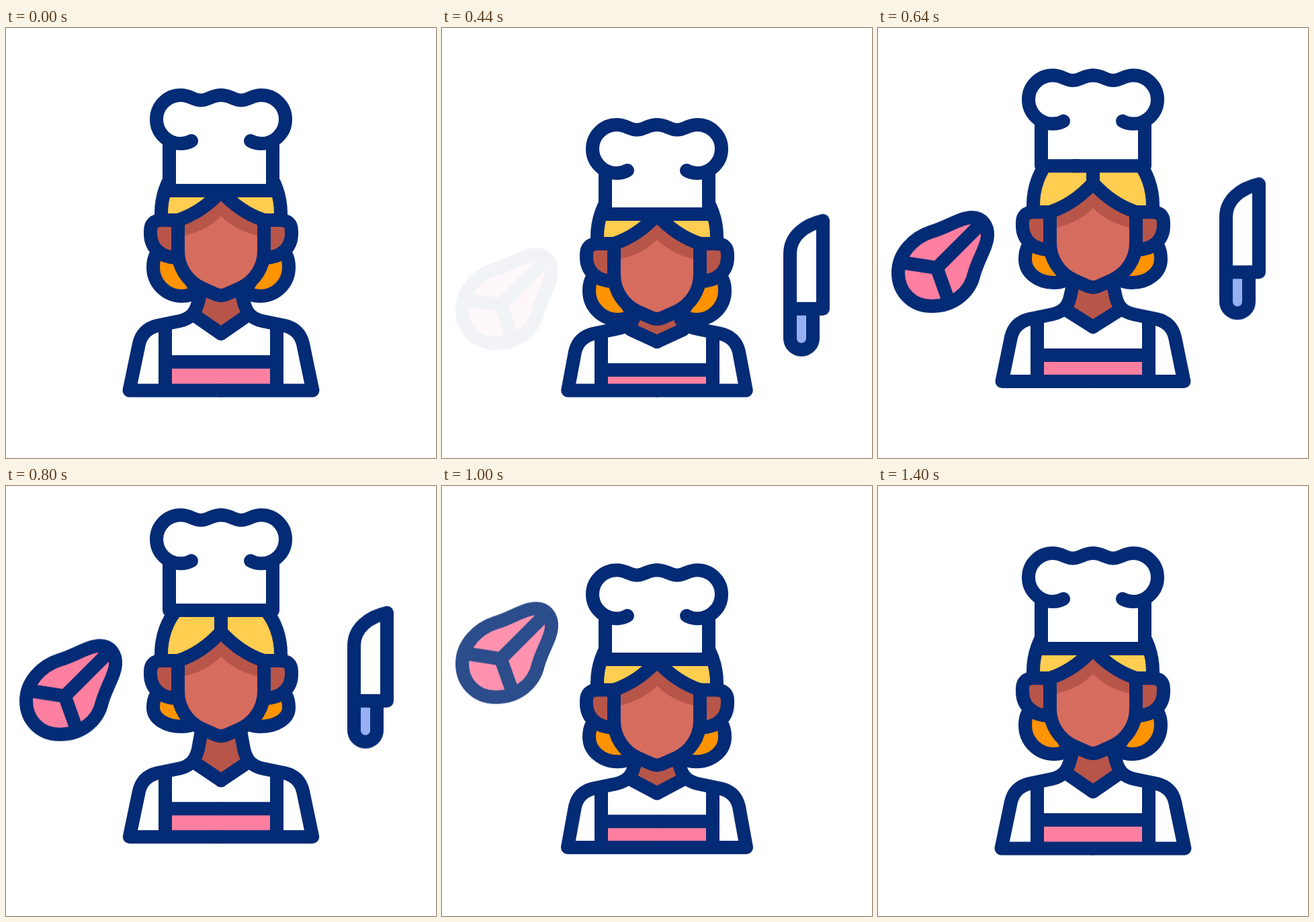
Write an HTML page that moves like this. It is 640 by 640 pixels and loops after 1600 ms.

```html
<!DOCTYPE html>
<html lang="en">
<head>
<meta charset="utf-8">
<title>Chef</title>
<style>
  html, body { margin: 0; width: 100%; height: 100%; overflow: hidden; background: #fff; }
  svg { display: block; width: 100%; height: 100%; }
  .line { fill: none; stroke: #042b75; stroke-width: 20; stroke-linecap: round; stroke-linejoin: round; }
  .flat { stroke-linecap: butt; }
  .skin { fill: #d66c5e; }
  .shade { fill: #b75549; }
  .blond { fill: #ffcd50; }
  .amber { fill: #ff9300; }
  .pink { fill: #ff7fa0; }
  .blue { fill: #97b0f4; }
  .white { fill: #fff; }
  #knife { animation: knife 1600ms linear infinite; }
  #steak { animation: steak 1600ms linear infinite; }
  @keyframes knife {
    0%, 18.125% { transform: translateY(139px); opacity: 0; }
    25.94% { opacity: 1; }
    52.19% { opacity: 1; }
    60%, 100% { transform: translateY(-43.6px); opacity: 0; }
  }
  @keyframes steak {
    0%, 27.125% { transform: translateY(101.3px); opacity: 0; }
    34.94% { opacity: 1; }
    61.31% { opacity: 1; }
    69.125%, 100% { transform: translateY(-84.7px); opacity: 0; }
  }
</style>
</head>
<body>
<svg viewBox="0 0 640 640">
  <g id="steak">
    <path class="line pink" d="M30 320C30 292 52 268 80 259C104 252 122 238 140 238C155 238 164 250 163 266C162 282 150 298 143 322C137 350 112 370 80 370C50 370 30 348 30 320Z"/>
    <path class="line" d="M33 304.5L87.5 313L148 252.5M87.5 313L105 362"/>
  </g>

  <g id="knife">
    <path class="blue" d="M518 320H552V364a17 17 0 0 1-34 0Z"/>
    <path class="line" d="M567 189C540 195 518 212 518 238V364a17 17 0 0 0 34 0V320M518 320H567V189"/>
  </g>

  <!-- left half of the chef, mirrored below -->
  <g id="half">
    <path id="neck" class="shade"/>
    <path id="apron" class="pink"/>
    <path id="straps" class="line flat"/>
    <path id="body" class="line"/>
    <path id="curl" class="line amber"/>
    <g id="head">
      <path class="blond" d="M256 286H231V276C231 250 240 226 254 210H320V243Q292 274 256 286Z"/>
      <path class="shade" d="M256 286H232Q215 286 215 302V306C215 326 229 342 256 342Z"/>
      <path class="shade" d="M320 243Q292 274 256 286V332H320Z"/>
      <path class="skin" d="M320 280Q296 304 256 311V332C256 356 270 377 291 387L309 395Q315 398 320 398Z"/>
      <path class="line" d="M231 286V276C231 250 240 226 254 210M256 286H232Q215 286 215 302V306C215 326 229 342 256 342"/>
      <path class="line" d="M320 212V243Q292 274 256 286V332C256 356 270 377 291 387L309 395Q315 398 320 398"/>
    </g>
    <path id="crown" class="white"/>
    <path id="brim" class="line flat"/>
    <path id="puff" class="line" d="M276 168Q269 172 260 172A36 36 0 0 1 260 100C274 100 279 107.5 290 107.5C301 107.5 306 100 320 100"/>
  </g>
  <use href="#half" transform="translate(640) scale(-1 1)"/>
</svg>
<script>
  const LOOP = 1600;
  const beats = [220, 440, 750, 1020, 1290, 1400];
  const lagBeats = [220, 440, 760, 1035, 1090, 1290, 1400];

  // offsets from the resting pose at each beat
  const moves = {
    brim: [0, 35, -64, 17, 1.5, 0],
    head: [0, 35, -30, 18, 1.5, 0],
    collar: [0, 21, -18.5, 9, 1, 0],
    shoulder: [0, 12, -18, 7.5, 0.5, 0],
    chest: [0, 12, -18.5, 2.6, 0.3, 0],
    base: [0, 0, -18.7, -1.3, 0, 0],
    hem: [0, 3.7, 0, 3.5, 0.3, 0]
  };
  // loose parts trail behind the rest
  const lagMoves = {
    puff: [0, 44, -61.5, 28.5, 28, 2, 0],
    hair: [0, 35, -44, 13.5, 10.5, 1, 0]
  };

  const el = id => document.getElementById(id);
  const draw = (id, d) => el(id).setAttribute('d', d);
  const shift = (id, y) => el(id).setAttribute('transform', `translate(0 ${y})`);

  function sample(t, times, values) {
    const i = times.findIndex(k => t < k);
    if (i < 1) return 0;
    const p = (t - times[i - 1]) / (times[i] - times[i - 1]);
    const e = (1 - Math.cos(Math.PI * p)) / 2;
    return values[i - 1] + (values[i] - values[i - 1]) * e;
  }

  function pose(t) {
    const m = {};
    for (const k in moves) m[k] = sample(t, beats, moves[k]);
    for (const k in lagMoves) m[k] = sample(t, lagBeats, lagMoves[k]);
    const { head: h, hair: b, collar: c, shoulder: s } = m;
    const tip = 455 + m.chest, band = 497 + m.chest;
    const floor = 539.5 + m.base, brim = 242 + m.brim, top = 166 + m.puff;

    shift('head', h);
    shift('puff', m.puff);
    // crown and brim reach past the middle to cover the parting of the other half
    draw('crown', `M243 ${top}V${brim}H340V${top}Z`);
    draw('brim', `M243 ${top}V${brim}H350`);
    draw('curl', `M224 ${336 + h}C220 ${342 + h} 219 ${349 + h} 219 ${356 + h}` +
      `C219 ${380 + (h + b) / 2} 238 ${399 + b} 262 ${399 + b}Q275 ${399 + b} 284 ${392 + b}L258 ${345 + h}`);
    draw('neck', `M290 ${390 + h}H320V${tip}L282 ${424 + c}Z`);
    draw('apron', `M237 ${band}H320V${floor}H237Z`);
    draw('straps', `M237 ${443 + s}V${floor}M237 ${band}H321`);
    draw('body', `M320 ${floor}H${183.5 + m.hem}L198 ${470 + s}Q203 ${448.5 + s} 225 ${443 + s}L259 ${436 + s}` +
      `C277 ${432 + s} 283 ${421 + c} 286 ${408 + c}L291 ${390 + h}M281 ${428 + c}L320 ${tip}`);
  }

  const start = performance.now();
  function tick() {
    pose((performance.now() - start) % LOOP);
    requestAnimationFrame(tick);
  }
  tick();
</script>
</body>
</html>
```
